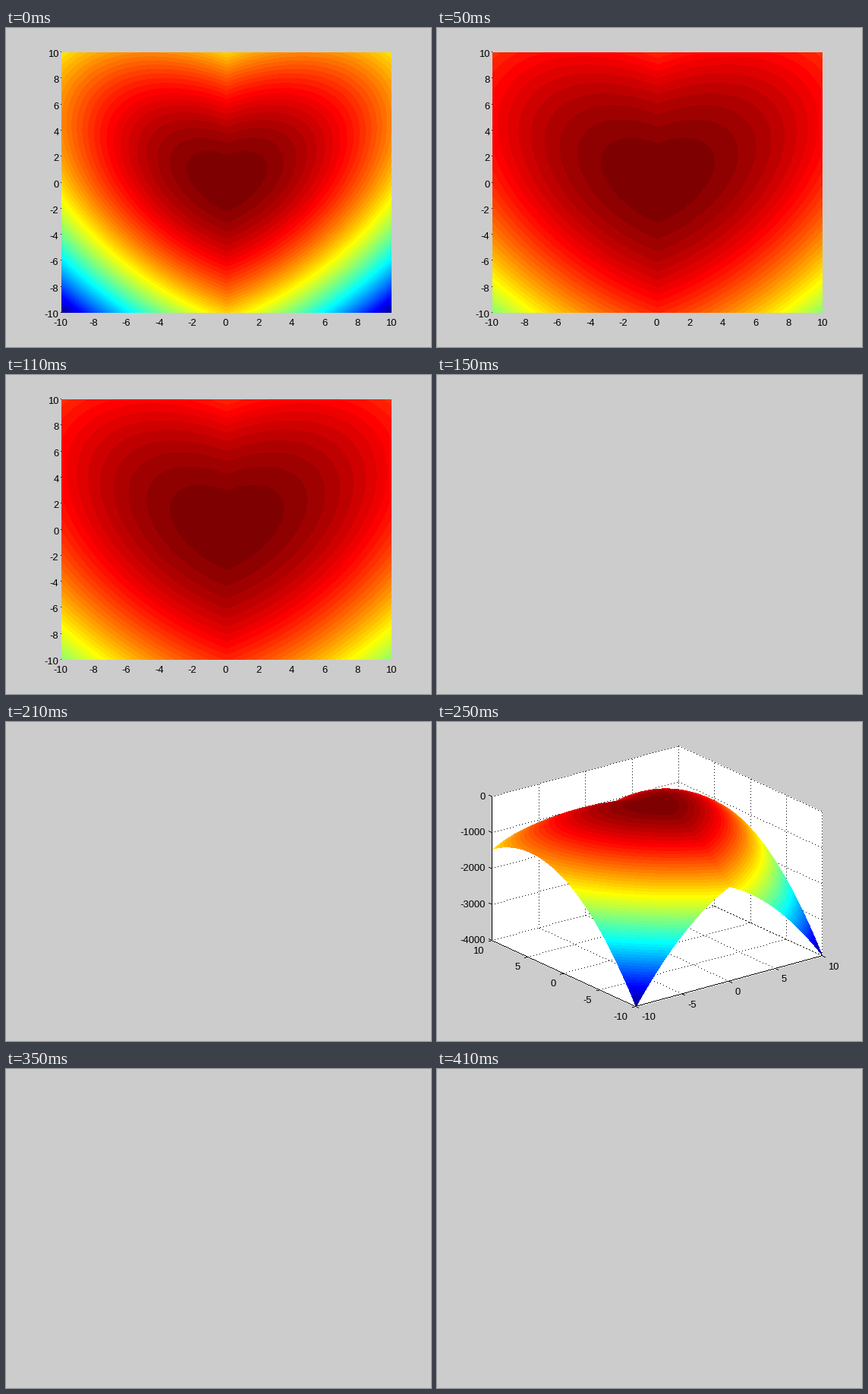
Write a matplotlib script that moves like this. It is 560 by 420 pixels and loops after 0.45 s.

```python
import numpy as np
import matplotlib.pyplot as plt
from matplotlib.animation import FuncAnimation
from matplotlib.patches import Polygon

W, H, DPI = 560, 420, 100
PX = 72 / DPI  # one pixel in points
LEFT, TOP, RIGHT, BOTTOM = 73, 32, 508, 375
Z_MIN = -4000

plt.rcParams.update({
    "font.family": "Liberation Sans",
    "font.size": 13 * PX,
    "axes.unicode_minus": False,
})


def heart(x, y):
    return -0.8 * (17 * x**2 - 16 * np.abs(x) * y + 17 * y**2)


def jet(z, low):
    """Colours of a 64-step jet map running from low to zero."""
    i = np.clip(np.floor(64 * (1 - z / low)), 0, 63)
    bands = [((i - 23), (71 - i)), ((i - 7), (55 - i)), ((i + 9), (39 - i))]
    return np.stack([np.clip(np.minimum(a, b) / 16, 0, 1) for a, b in bands], axis=-1)


def project(x, y, z):
    """Orthographic view, azimuth -37.5 and elevation 30 degrees."""
    u, v, w = (x + 10) / 20, (y + 10) / 20, 1 - z / Z_MIN
    return (LEFT + 188.8 + 246.2 * u - 188.8 * v,
            BOTTOM - 66.8 * u - 86.8 * v - 189.4 * w)


fig = plt.figure(figsize=(W / DPI, H / DPI), dpi=DPI, facecolor="#cccccc")
ax = fig.add_axes([0, 0, 1, 1])
ax.axis("off")


def blank():
    return np.zeros((H, W, 4))


def picture(pixels, extent=(0, W, H, 0), z=2):
    return ax.imshow(pixels, extent=extent, interpolation="nearest",
                     aspect="auto", zorder=z)


def line(pixels, start, end, step=1):
    """Black one-pixel line; a step above one leaves separate dots."""
    (x0, y0), (x1, y1) = start, end
    n = int(round(max(abs(x1 - x0), abs(y1 - y0))))
    t = np.arange(0, n + 1, step) / max(n, 1)
    cols = np.floor(x0 + (x1 - x0) * t - 0.5).astype(int)
    rows = np.floor(y0 + (y1 - y0) * t - 0.5).astype(int)
    pixels[rows, cols] = (0, 0, 0, 1)


def line_3d(pixels, points, step=1):
    ends = [project(*p) for p in points]
    for start, end in zip(ends, ends[1:]):
        line(pixels, start, end, step)


def label(x, y, value, ha):
    return ax.text(x, y + 4.5, str(value), ha=ha, va="baseline", zorder=4)


def flat_map(low):
    w, h = RIGHT - LEFT, BOTTOM - TOP
    x = (np.arange(w) / w - 0.5) * 20
    y = (0.5 - np.arange(h) / h) * 20
    return picture(jet(heart(*np.meshgrid(x, y)), low), (LEFT, RIGHT, BOTTOM, TOP))


def flat_axes():
    parts, ticks = [], blank()
    for t in range(-10, 11, 2):
        x = (LEFT + RIGHT) / 2 + t * (RIGHT - LEFT) / 20
        y = (TOP + BOTTOM) / 2 - t * (BOTTOM - TOP) / 20
        parts.append(label(x - (1.5 if t < 0 else 1), 387, t, "center"))
        parts.append(label(69.5, y + 1.5, t, "right"))
        line(ticks, (LEFT, y), (LEFT, y))
    return parts + [picture(ticks, z=3)]


def draw_surface(pixels, fine=3):
    """Splat a fine grid from back to front, then keep whole-pixel points."""
    steps = np.linspace(10, -10, 2401)
    y, x = np.meshgrid(steps, steps)
    z = heart(x, y)
    px, py = (np.rint(fine * p).astype(int).ravel() for p in project(x, y, z))
    height = np.full((H * fine, W * fine), np.nan)
    height[py, px] = z.ravel()
    height = height[::fine, ::fine]
    hit = ~np.isnan(height)
    pixels[hit, :3] = jet(height[hit], Z_MIN)
    pixels[hit, 3] = 1


def draw_grid(pixels):
    for t in range(-10, 11, 5):
        line_3d(pixels, [(t, -10, Z_MIN), (t, 10, Z_MIN), (t, 10, 0)], 4)
        line_3d(pixels, [(-10, t, Z_MIN), (10, t, Z_MIN), (10, t, 0)], 4)
    for z in range(Z_MIN, 1, 1000):
        line_3d(pixels, [(-10, 10, z), (10, 10, z), (10, -10, z)], 4)


def draw_axes(pixels):
    """Solid axis lines and ticks; returns the tick labels."""
    line_3d(pixels, [(-10, 10, 0), (-10, 10, Z_MIN), (-10, -10, Z_MIN), (10, -10, Z_MIN)])

    def tick(point, dx, dy):
        x, y = project(*point)
        line(pixels, (x, y), (x + dx, y + dy))
        return x, y

    parts = []
    for t in range(-10, 11, 5):
        x, y = tick((t, -10, Z_MIN), 4, 1.9)
        parts.append(label(x + 7.5, y + 13, t, "left"))
        x, y = tick((-10, t, Z_MIN), -4, 1.1)
        parts.append(label(x - 11, y + 12, t, "right"))
    for t in range(Z_MIN, 1, 1000):
        x, y = tick((-10, 10, t), -4, -1.9)
        parts.append(label(x - 9.5, y - 1.5, t, "right"))
    return parts


def solid_scene():
    hull = [(-10, 10, Z_MIN), (-10, -10, Z_MIN), (10, -10, Z_MIN),
            (10, -10, 0), (10, 10, 0), (-10, 10, 0)]
    box = ax.add_patch(Polygon([project(*p) for p in hull], fc="white", ec="none",
                               antialiased=False, zorder=0))
    pixels = blank()
    draw_grid(pixels)
    draw_surface(pixels)
    labels = draw_axes(pixels)
    return [box, picture(pixels)] + labels


axes_2d = flat_axes()
scenes = {
    "near": [flat_map(Z_MIN)] + axes_2d,
    "wide": [flat_map(2 * Z_MIN)] + axes_2d,
    "solid": solid_scene(),
    "blank": [],
}
ax.set_xlim(0, W)
ax.set_ylim(H, 0)

ORDER = ["near"] + ["wide"] * 2 + ["blank"] * 2 + ["solid"] * 2 + ["blank"] * 2


def update(i):
    for parts in scenes.values():
        for part in parts:
            part.set_visible(False)
    for part in scenes[ORDER[i]]:
        part.set_visible(True)
    return []


anim = FuncAnimation(fig, update, frames=len(ORDER), interval=50,
                     repeat=True, repeat_delay=0, blit=False)
plt.show()
```
